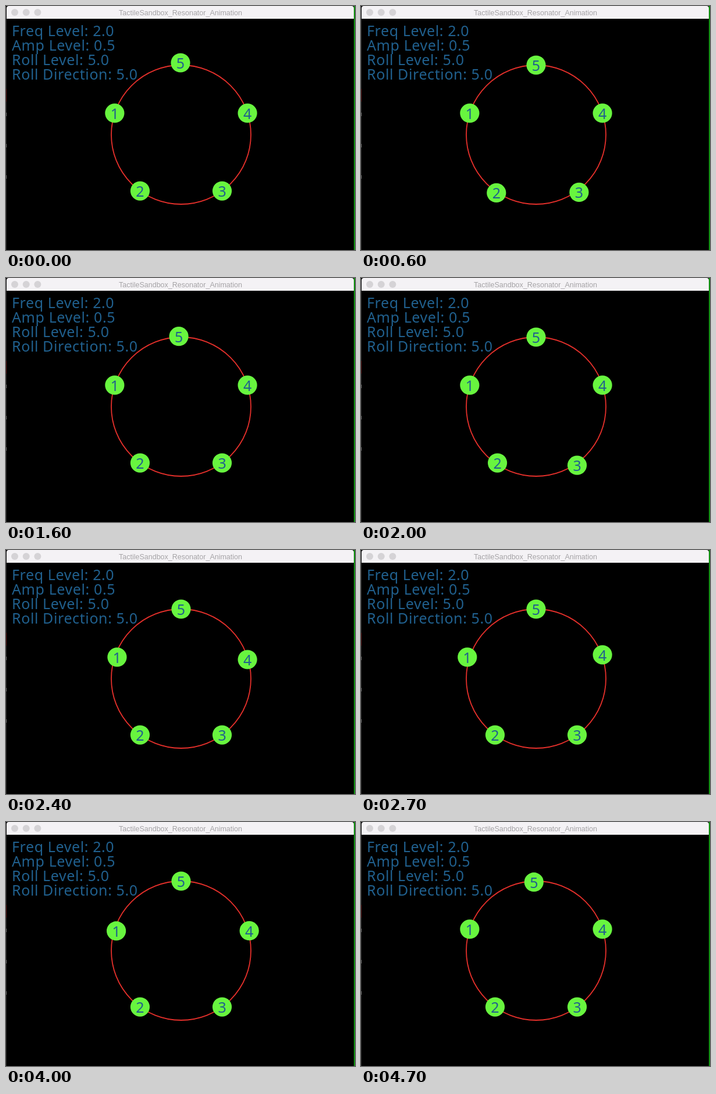
Write an HTML page with a canvas that moves like this. It is 600 px wide and 421 px high and loops after 4.8 s.

```html
<!DOCTYPE html>
<html lang="en">
<head>
<meta charset="utf-8">
<title>Actuator ring</title>
<style>
  html, body { margin: 0; width: 100%; height: 100%; overflow: hidden; background: #000; }
  canvas { display: block; }
</style>
</head>
<body>
<canvas id="stage" width="600" height="421"></canvas>
<script>
(() => {
  const ctx = document.getElementById('stage').getContext('2d');
  const LOOP = 4800, STEP = 100;
  const ROLL = 1520; // time for the vibration to go once round the ring
  const CX = 301, CY = 222, RADIUS = 120, SHAKE = 4.1;
  const INK = '#20608e', GREEN = '#68f53f';
  const BODY = '25px "Noto Sans", "Open Sans", sans-serif';
  const TITLE = '12.5px "Liberation Sans", Arial, sans-serif';
  const LABELS = ['Freq Level: 2.0', 'Amp Level: 0.5', 'Roll Level: 5.0', 'Roll Direction: 5.0'];

  const rad = deg => deg * Math.PI / 180;

  // Offset of a group that buzzes for `length` ms once per roll;
  // angle(u) gives degrees at u ms into the burst
  function buzz(t, begin, length, angle) {
    const u = (t - begin + ROLL) % ROLL;
    if (u > length) return [0, 0];
    const a = rad(angle(u));
    return [SHAKE * Math.cos(a), SHAKE * Math.sin(a)];
  }

  const mirror = ([x, y]) => [y, x];

  function disc(x, y, r, color) {
    ctx.fillStyle = color;
    ctx.beginPath();
    ctx.arc(x, y, r, 0, Math.PI * 2);
    ctx.fill();
  }

  function rect(x, y, w, h, color) {
    ctx.fillStyle = color;
    ctx.fillRect(x, y, w, h);
  }

  function text(str, x, y, font, color, align, gap = '0px') {
    ctx.font = font;
    ctx.fillStyle = color;
    ctx.textAlign = align;
    ctx.letterSpacing = gap;
    ctx.fillText(str, x, y);
  }

  function drawWindow() {
    rect(0, 0, 600, 421, '#000');
    rect(0, 22, 1, 399, '#262626');
    rect(0, 143, 1, 22, '#5a1818');
    for (let i = 0; i < 3; i++) rect(0, 184 + 54 * i, 1, 6, '#777');
    ctx.fillStyle = '#f4f2f5';
    ctx.beginPath();
    ctx.roundRect(1, 0, 597, 22, [4, 4, 0, 0]);
    ctx.fill();
    for (let i = 0; i < 3; i++) disc(15 + 19.7 * i, 11, 6, '#d5d3d6');
    text('TactileSandbox_Resonator_Animation', 300, 16, TITLE, '#a5a3a6', 'center');
    rect(598, 0, 2, 421, '#109010');
  }

  // Actuators stand on a regular pentagon, number 5 at the top
  function drawNode(id, [dx, dy]) {
    const a = rad(-90 - 72 * id);
    const x = CX + RADIUS * Math.cos(a) + dx;
    const y = CY + RADIUS * Math.sin(a) + dy;
    disc(x, y, 16.6, GREEN);
    text(id, x, y + 10, BODY, INK, 'center');
  }

  function draw(t) {
    drawWindow();
    LABELS.forEach((s, i) => text(s, 10, 52 + 25 * i, BODY, INK, 'left', '0.6px'));

    ctx.strokeStyle = '#e5302b';
    ctx.lineWidth = 1.8;
    ctx.beginPath();
    ctx.arc(CX, CY, RADIUS, 0, Math.PI * 2);
    ctx.stroke();

    const peak = buzz(t, -282, 425, u => 99 - 0.72 * u);
    const upper = buzz(t, 880, 330, u => 0.6 * u);
    const lower = buzz(t, 235, 430, () => (2000 - t) * 720 / 1300);
    [upper, lower, mirror(lower), mirror(upper), peak].forEach((d, i) => drawNode(i + 1, d));
  }

  const start = performance.now();
  function tick() {
    const t = (performance.now() - start) % LOOP;
    draw(Math.floor(t / STEP) * STEP);
    requestAnimationFrame(tick);
  }
  tick();
})();
</script>
</body>
</html>
```
